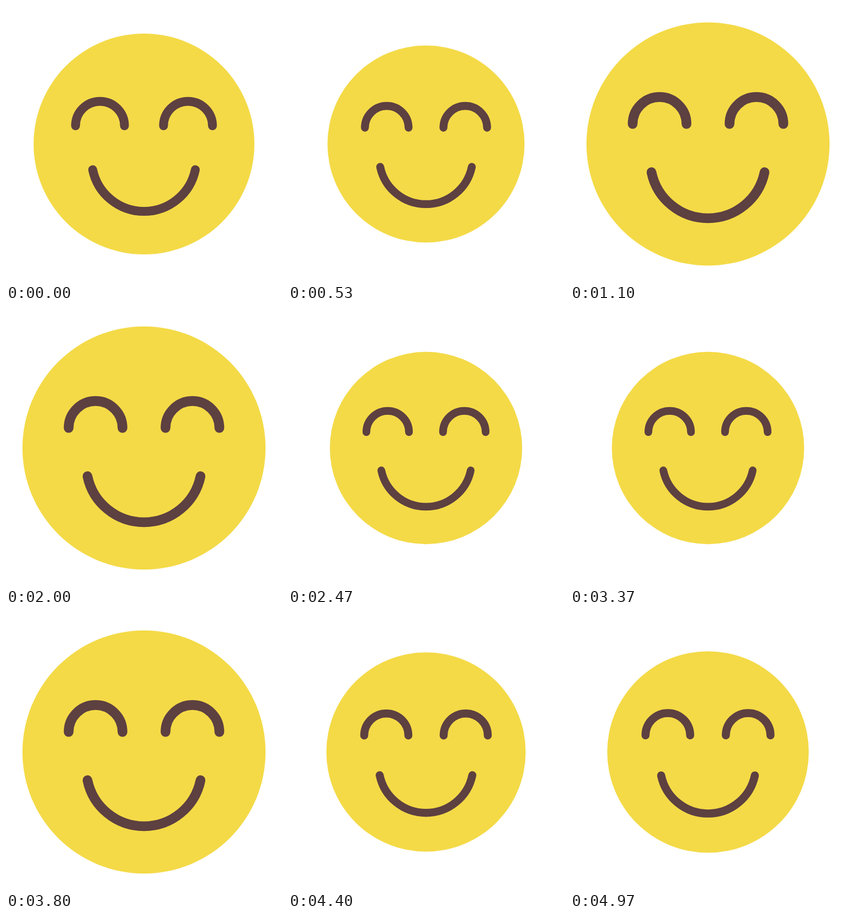
These frames come from a looping animation (500 by 500 pixels, 5010 ms). An HTML page:

```html
<!DOCTYPE html>
<html lang="en">
<head>
<meta charset="utf-8">
<title>Pulsing smiley</title>
<style>
html, body { margin: 0; width: 100%; height: 100%; overflow: hidden; background: #fff; }
svg { display: block; width: 100%; height: 100%; }
</style>
</head>
<body>
<svg viewBox="-250 -250 500 500">
  <g id="face">
    <circle r="200" fill="#f4da47"/>
    <path d="M-124 -33a44.3 44.3 0 0 1 88.6 0M35.4 -33a44.3 44.3 0 0 1 88.6 0M-93 46.5a95 95 0 0 0 186 0"
      fill="none" stroke="#5d4040" stroke-width="16" stroke-linecap="round"/>
  </g>
</svg>
<script>
const LOOP = 5010, FRAMES = 150, BEAT = 27;
// [frame within the beat, scale]
const KEYS = [[0, 1], [3.7, 1.134], [23.3, 0.8665], [BEAT, 1]];
const face = document.getElementById('face');

const bezier = (a, b, u) => 3 * a * u * (1 - u) ** 2 + 3 * b * u * u * (1 - u) + u ** 3;

// Same curve as the CSS "ease" keyword
function ease(x) {
  let lo = 0, hi = 1;
  for (let i = 0; i < 30; i++) {
    const mid = (lo + hi) / 2;
    if (bezier(0.25, 0.25, mid) < x) lo = mid; else hi = mid;
  }
  return bezier(0.1, 1, lo);
}

function scaleAt(frame) {
  const p = frame % BEAT;
  const i = KEYS.findIndex(([end]) => p < end);
  const [t0, s0] = KEYS[i - 1], [t1, s1] = KEYS[i];
  return s0 + (s1 - s0) * ease((p - t0) / (t1 - t0));
}

const start = performance.now();
function draw() {
  const ticks = Math.floor((performance.now() - start) % LOOP / 10);
  const frame = Math.min(FRAMES - 1, Math.floor((3 * ticks + 2) / 10));
  face.setAttribute('transform', `scale(${scaleAt(frame)})`);
  requestAnimationFrame(draw);
}
draw();
</script>
</body>
</html>
```
